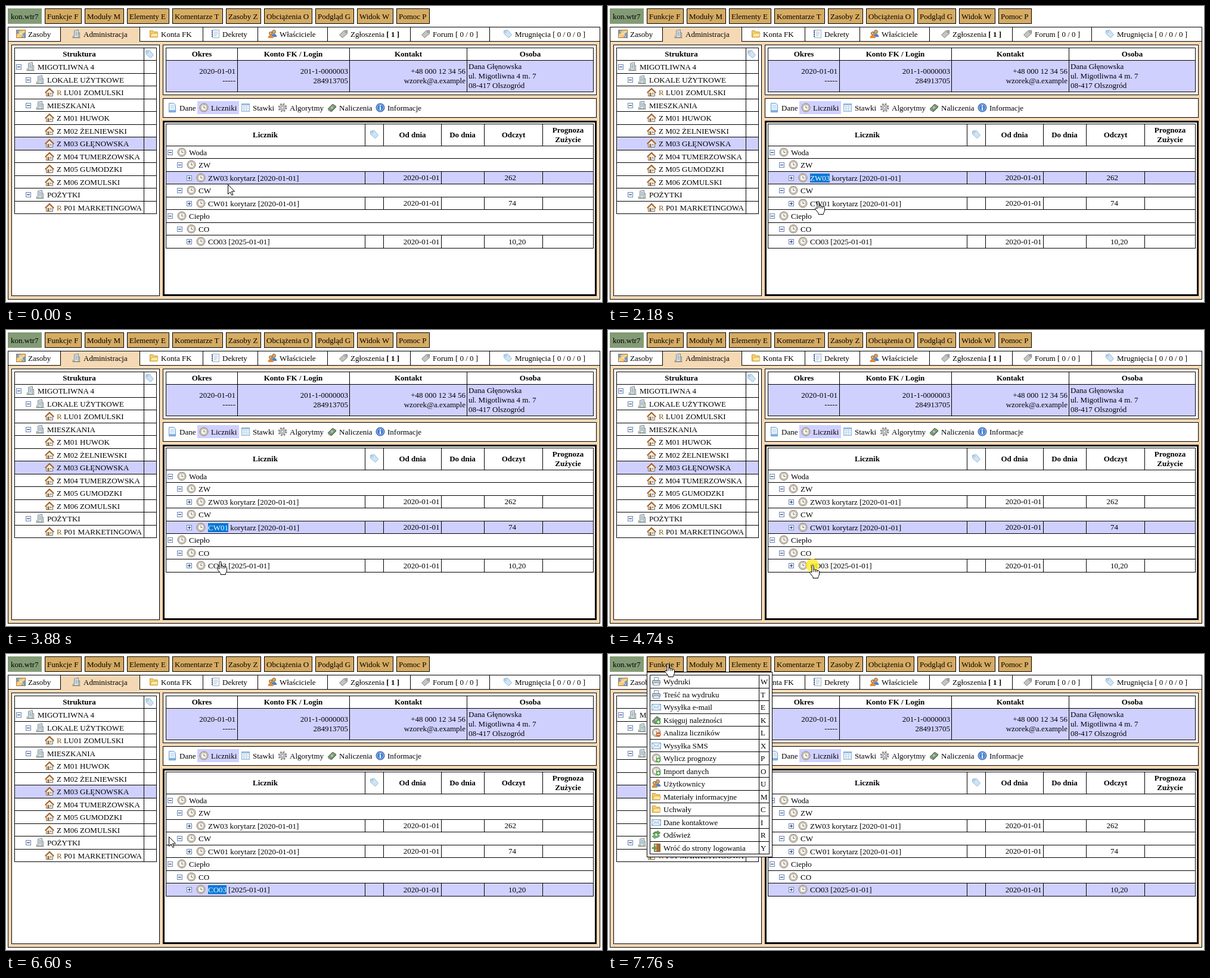
Animation, 1000 px wide and 498 px high, one loop 8 s. Source, as an HTML page:

```html
<!DOCTYPE html>
<html lang="pl">
<head>
<meta charset="utf-8">
<title>Administracja</title>
<style>
  html, body { margin: 0; width: 100%; height: 100%; overflow: hidden; background: #fff; }
  svg { display: block; }
  text { font: 13px "Liberation Serif", "Times New Roman", serif; white-space: pre; }
  .b { font-weight: bold; }
  .m { text-anchor: middle; }
  .e { text-anchor: end; }
  .flag { fill: #8b5a14; }
</style>
</head>
<body>
<svg id="stage" width="1000" height="498" viewBox="0 0 1000 498"></svg>
<script>
const PEACH = '#f5d9b5', PICK = '#d0d0ff', GOLD = '#d6ab62', LOOP = 8000;

// Icons on a 16 x 16 grid
const clock = `<circle cx="8" cy="8" r="7" fill="#d8cdb6" stroke="#85807a"/>
  <circle cx="8" cy="8" r="4.8" fill="#fbfaf6" stroke="#b3aa9a"/>
  <path d="M8 5v3.5h2.5" fill="none" stroke="#666"/>`;
const cash = `<path d="M1 10 9 2l6 4-8 8z" fill="#7d9a78" stroke="#56684f"/>
  <path d="M1 12l6 3 8-8" fill="none" stroke="#667a60"/><circle cx="8" cy="8" r="2" fill="#b4c6a8"/>`;
const badge = (fill, d) => `<circle cx="11.5" cy="11.5" r="4" fill="${fill}"/><path d="${d}" stroke="#fff" stroke-width="1.4"/>`;
const plus = badge('#4ba446', 'M9 11.5h5M11.5 9v5');
const icons = {
  map: `<rect x=".5" y="1.5" width="15" height="13" fill="#f3c675" stroke="#a87a3c"/>
    <path d="M1 2h6l-3 5-3 1zM9 14l2-6 4-3v9z" fill="#6d9fd2"/><path d="M1 13 14 3M4 3l9 10" stroke="#fff2cf"/>`,
  building: `<path d="M4.5 14V2.5l7-1.5v13z" fill="#dce5ea" stroke="#7e8c94"/>
    <path d="M6 5h4M6 7.5h4M6 10h4" stroke="#7d94a5"/><path d="M11 6h2.5v8M1.5 14.5h13M2.5 14v-3" fill="none" stroke="#768576"/>`,
  folder: `<path d="M1.5 13.5v-11h5l1.5 2h6v9z" fill="#f5cf6d" stroke="#cb9a35"/>
    <path d="M2 13 4.5 7H15l-1 6z" fill="#ffe9a5" stroke="#d9ab45"/>`,
  note: `<rect x="3.5" y="1.5" width="11" height="13" fill="#f5f8fb" stroke="#9fb0be"/>
    <path d="M3 2v12" stroke="#3c5f93" stroke-width="2" stroke-dasharray="2 1"/><path d="M6 5h6M6 8h6M6 11h4" stroke="#9eb8d0"/>`,
  users: `<circle cx="10.5" cy="4.5" r="3" fill="#d9a66c" stroke="#8a5c2c"/><path d="M6 13q0-5 4.5-5t5 5z" fill="#4c84c4"/>
    <circle cx="5" cy="7" r="2.5" fill="#e8b87a" stroke="#7a5028"/><path d="M.5 15q0-5 4.5-5t5 5z" fill="#e28b39"/>`,
  tag: `<path d="M1.5 2.5 8 1.5l6.5 8-5 5-8-7z" fill="#cfe4f5" stroke="#8fb5d8"/><circle cx="4.5" cy="4.5" r="1.3" fill="#fff" stroke="#7fa8ce"/>`,
  grayTag: `<path d="M14.5 2 9 2.5 1.5 9.5l5 5 8-7z" fill="#c2c6c2" stroke="#7e837f"/><circle cx="12" cy="4.8" r="1.2" fill="#fff" stroke="#777"/>`,
  page: `<path d="M2.5.5h8l3 3v12h-11z" fill="#e1effc" stroke="#6f9dcc"/><path d="M3 12h10v3H3z" fill="#83b4e4"/><path d="M5 5h6M5 8h6" stroke="#b8d2ea"/>`,
  clock,
  clockPlus: clock + plus,
  clockMinus: clock + badge('#d9632f', 'M9 11.5h5'),
  cash,
  cashPlus: cash + plus,
  grid: `<rect x="1.5" y="1.5" width="13" height="13" fill="#f4f9fd" stroke="#8db2d2"/><path d="M2 3h12" stroke="#8fbbe0" stroke-width="2"/>
    <path d="M2 6.5h12M2 9.5h12M2 12.5h12M5.5 2v12M9.5 2v12" stroke="#bcd4e8"/>`,
  gear: `<circle cx="8" cy="8" r="6" fill="none" stroke="#8d8f8d" stroke-width="3" stroke-dasharray="2.7 2"/>
    <circle cx="8" cy="8" r="4.5" fill="#d2d4d2" stroke="#909290"/><circle cx="8" cy="8" r="2" fill="#fff" stroke="#888"/>`,
  info: `<circle cx="8" cy="8" r="7" fill="#4a82d0" stroke="#2d5ca6"/><circle cx="8" cy="8" r="5.5" fill="none" stroke="#a9c8ef"/>
    <path d="M8 4v2M8 7v5" stroke="#fff" stroke-width="2"/>`,
  house: `<path d="M2.5 8v6.5h11V8L8 3z" fill="#f4eddc" stroke="#7d705a"/><path d="M.7 9 8 1.8 15.3 9" fill="none" stroke="#a9652f" stroke-width="2"/>
    <rect x="4.5" y="9" width="3" height="5.5" fill="#a66d3b"/><rect x="9" y="9" width="2.5" height="3" fill="#7daada"/>`,
  printer: `<path d="M4.5 7V1.5h7V7" fill="#f5f9fd" stroke="#7f97ad"/><rect x="1.5" y="6.5" width="13" height="6" rx="1" fill="#bcc8d2" stroke="#667683"/>
    <path d="M3.5 10.5h9l1 4h-11z" fill="#edf4fa" stroke="#7f97ad"/>`,
  mail: `<rect x=".5" y="3.5" width="15" height="10" fill="#e5f1fb" stroke="#7da5cc"/><path d="M1 4l7 5.5L15 4M1 13l5-5M15 13l-5-5" fill="none" stroke="#8fb4d6"/>`,
  refresh: `<path d="M2 7q2-5 8-4V1l5 4-5 4V6Q6 5 5 7z" fill="#5ca05a" stroke="#3c7a3d" stroke-width=".6"/>
    <path d="M14 9q-2 5-8 4v2l-5-4 5-4v3q4 1 5-1z" fill="#76b56e" stroke="#3c7a3d" stroke-width=".6"/>`,
  door: `<path d="M4.5 1.5h10v13h-10z" fill="#d6b184" stroke="#82582c"/><path d="M8.5 2 14 1v14.5l-5.5-2z" fill="#a66d35"/>
    <path d="M1 7h4V4.5L9 8.5l-4 4V10H1z" fill="#58a44f"/>`
};

const rect = (x, y, w, h, fill = '#000') => `<rect x="${x}" y="${y}" width="${w}" height="${h}" fill="${fill}"/>`;
const hLine = (x0, x1, y) => rect(x0, y, x1 - x0 + 1, 1);
const vLine = (x, y0, y1) => rect(x, y0, 1, y1 - y0 + 1);
const panel = (x0, y0, x1, y1, fill = '#fff', w = 1) =>
  rect(x0, y0, x1 - x0 + 1, y1 - y0 + 1) + rect(x0 + w, y0 + w, x1 - x0 + 1 - 2 * w, y1 - y0 + 1 - 2 * w, fill);
const label = (x, y, s, cls = '') => `<text x="${x}" y="${y}" class="${cls}">${s}</text>`;
const icon = (name, x, y) => `<use href="#${name}" x="${x}" y="${y}"/>`;
const toggle = (x, y, open) => `<rect x="${x + .5}" y="${y + .5}" width="8" height="8" fill="#f2f6fc" stroke="#6b87b5"/>` +
  rect(x + 2, y + 4, 5, 1, '#1c2f66') + (open ? '' : rect(x + 4, y + 2, 1, 5, '#1c2f66'));

const leftY = k => Math.round(91 + 21.5 * k);
const rightY = k => Math.floor(235 + 21.5 * k);

function topBar() {
  const buttons = [[65, 127, 'Funkcje F'], [132, 198, 'Moduły M'], [203, 274, 'Elementy E'], [279, 364, 'Komentarze T'],
    [369, 428, 'Zasoby Z'], [433, 514, 'Obciążenia O'], [519, 584, 'Podgląd G'], [589, 650, 'Widok W'], [655, 711, 'Pomoc P']];
  return rect(3, 4, 57, 26, '#829b75') + label(8, 22, 'kon.wtr7') +
    buttons.map(([a, b, s]) => panel(a, 4, b - 1, 29, GOLD) + label(a + 4, 22, s)).join('');
}

function tabs() {
  const list = [[3, 17, 'map', 'Zasoby'], [91, 110, 'building', 'Administracja'], [224, 240, 'folder', 'Konta FK'],
    [330, 343, 'note', 'Dekrety'], [422, 439, 'users', 'Właściciele'], [539, 558, 'grayTag', 'Zgłoszenia <tspan class="b">[ 1 ]</tspan>'],
    [678, 696, 'grayTag', 'Forum [ 0 / 0 ]'], [811, 834, 'tag', 'Mrugnięcia [ 0 / 0 / 0 ]']];
  return panel(3, 35, 996, 493, PEACH) + rect(4, 36, 992, 23, '#fff') + hLine(3, 996, 59) + rect(92, 36, 132, 24, PEACH) +
    list.map(([x, ix, name, s]) => vLine(x, 35, 59) + icon(name, ix, 39) + label(ix + 20, 52, s)).join('');
}

function tree() {
  const rows = [[0, 'MIGOTLIWNA 4'], [1, 'LOKALE UŻYTKOWE'], [2, 'LU01 ZOMULSKI', 'R'], [1, 'MIESZKANIA'], [2, 'M01 HUWOK', 'Z'],
    [2, 'M02 ŻELNIEWSKI', 'Z'], [2, 'M03 GŁĘNOWSKA', 'Z'], [2, 'M04 TUMERZOWSKA', 'Z'], [2, 'M05 GUMODZKI', 'Z'],
    [2, 'M06 ZOMULSKI', 'Z'], [1, 'POŻYTKI'], [2, 'P01 MARKETINGOWA', 'R']];
  let s = panel(9, 65, 257, 487) + panel(14, 70, 252, 349) + rect(15, leftY(6), 237, 22, PICK);
  s += label(123, 85, 'Struktura', 'b m') + icon('tag', 233, 73);
  rows.forEach(([level, name, flag], k) => {
    const y = Math.round(107 + 21.5 * k), x = 33 + 16 * level;
    s += hLine(14, 252, leftY(k)) + icon(flag ? 'house' : 'building', x, y - 13);
    if (!flag) s += toggle(x - 16, y - 9, true);
    const mark = flag ? `<tspan class="${flag === 'R' ? 'flag' : ''}">${flag}</tspan> ` : '';
    s += label(x + 20, y, mark + name);
  });
  return s + vLine(231, 70, 349);
}

function details() {
  let s = panel(263, 65, 990, 149) + panel(268, 70, 985, 144) + rect(269, 92, 716, 52, PICK) + hLine(268, 985, 91);
  s += [388, 576, 773].map(x => vLine(x, 70, 144)).join('');
  s += [[328.5, 'Okres'], [482, 'Konto FK / Login'], [675, 'Kontakt'], [879.5, 'Osoba']].map(([x, t]) => label(x, 85, t, 'b m')).join('');
  s += [[385, '2020-01-01', '-----'], [574, '201-1-0000003', '284913705'], [771, '+48 000 12 34 56', 'wzorek@a.example']]
    .map(([x, a, b]) => label(x, 114, a, 'e') + label(x, 130, b, 'e')).join('');
  return s + ['Dana Głęnowska', 'ul. Migotliwna 4 m. 7', '08-417 Olszogród'].map((t, i) => label(776, 106 + 16 * i, t)).join('');
}

function toolbar() {
  const items = [[271, 'page', 'Dane'], [324, 'clock', 'Liczniki'], [394, 'grid', 'Stawki'],
    [456, 'gear', 'Algorytmy'], [539, 'cash', 'Naliczenia'], [620, 'info', 'Informacje']];
  return panel(263, 155, 990, 187) + rect(321, 160, 70, 22, PICK) +
    items.map(([x, name, s]) => icon(name, x, 163) + label(x + 20, 176, s)).join('');
}

const cols = [602, 633, 730, 802, 900];

function meters() {
  const rows = [[0, 'Woda'], [1, 'ZW'], [2, 'ZW03 korytarz [2020-01-01]', '262'], [1, 'CW'], [2, 'CW01 korytarz [2020-01-01]', '74'],
    [0, 'Ciepło'], [1, 'CO'], [2, 'CO03 [2025-01-01]', '10', ',20']];
  let s = hLine(268, 985, 198) + hLine(268, 985, 407) + [268, 985].map(x => vLine(x, 198, 407)).join('');
  s += cols.map(x => vLine(x, 198, 235)).join('') + icon('tag', 610, 208);
  s += [[435, 221, 'Licznik'], [682, 221, 'Od dnia'], [766, 221, 'Do dnia'], [851.5, 221, 'Odczyt'], [943, 213, 'Prognoza'], [943, 229, 'Zużycie']]
    .map(([x, y, t]) => label(x, y, t, 'b m')).join('');
  rows.forEach(([level, name, whole, part = ''], k) => {
    const y = Math.floor(251 + 21.5 * k), cellY = Math.floor(250.5 + 21.5 * k), x = 287 + 16 * level;
    s += hLine(268, 985, rightY(k)) + toggle(x - 16, y - 9, !whole) + icon('clock', x, y - 13) + label(x + 20, y, name);
    if (whole) {
      s += cols.map(c => vLine(c, rightY(k), rightY(k + 1))).join('');
      s += label(727.5, cellY, '2020-01-01', 'e') + label(856, cellY, whole, 'e') + label(856, cellY, part);
    }
  });
  return s;
}

function menu() {
  const items = [['printer', 'Wydruki', 'W'], ['printer', 'Treść na wydruku', 'T'], ['mail', 'Wysyłka e-mail', 'E'],
    ['cashPlus', 'Księguj należności', 'K'], ['clockMinus', 'Analiza liczników', 'L'], ['mail', 'Wysyłka SMS', 'X'],
    ['clockPlus', 'Wylicz prognozy', 'P'], ['clockPlus', 'Import danych', 'O'], ['users', 'Użytkownicy', 'U'],
    ['folder', 'Materiały informacyjne', 'M'], ['folder', 'Uchwały', 'C'], ['mail', 'Dane kontaktowe', 'I'],
    ['refresh', 'Odśwież', 'R'], ['door', 'Wróć do strony logowania', 'Y']];
  return panel(65, 30, 275, 341) + panel(70, 35, 270, 336) + vLine(253, 35, 336) + items.map(([name, s, key], k) => {
    const y = Math.floor(51.5 + 21.5 * k);
    return hLine(70, 270, Math.round(35 + 21.5 * k)) + icon(name, 73, y - 13) + label(93, y, s) + label(256, y, key);
  }).join('');
}

const stage = document.getElementById('stage');
stage.innerHTML = `<defs>${Object.entries(icons).map(([id, d]) => `<symbol id="${id}" width="16" height="16" viewBox="0 0 16 16">${d}</symbol>`).join('')}</defs>
  ${topBar()}${tabs()}${tree()}${details()}${toolbar()}${panel(263, 193, 990, 487, '#fff', 3)}
  <rect id="active" x="269" width="716" height="22" fill="${PICK}"/>${meters()}
  <rect id="mark" x="339" height="15" fill="#0078d7"/><text id="marked" x="339" fill="#fff"></text>
  <g id="menu">${menu()}</g>
  <circle id="press" r="11" fill="#ffec1f"/>
  <g id="cursor" fill="#fff" stroke="#000" stroke-linejoin="round">
    <path id="arrow" d="M.5.5v16l3.7-3.5 2.5 5.5 2.3-1-2.5-5.5h5z"/>
    <path id="hand" d="M-1 13V2Q-1 .5.5.5T2 2v6q2-1 3.2.5Q7 8 8 9.5q2.7-.5 3.5 1.5v5q-.5 3-2 4.5v2H1v-2l-5.5-7q0-2 2-1.5zM2 8v4M5.2 8.500v4M8 9.5v3"/>
  </g>`;
const el = id => document.getElementById(id);

// Pointer moves: start, end, steps, then one point or a quadratic curve
const moves = [
  [0, 0, 1, 372, 300],
  [80, 80, 1, 371, 300],
  [230, 780, 8, 369, 299, 355, 290, 346, 289],
  [1080, 1470, 6, 340, 288, 356, 288, 373, 288],
  [1850, 2410, 8, 373, 288, 353, 341, 338, 331],
  [2730, 3340, 9, 342, 332, 356, 333, 371, 338],
  [3720, 4190, 7, 371, 338, 352, 438, 340, 396],
  [4420, 4420, 1, 343, 395],
  [4740, 5280, 8, 343, 395, 346, 396, 366, 395],
  [5450, 5450, 1, 367, 395],
  [5830, 5830, 1, 367, 391],
  [6290, 7060, 11, 362, 390, 255, 323, 126, 73],
  [7140, 7440, 5, 122, 66, 108, 35, 100, 16]
];
const presses = [[1080, 1850], [2730, 3720], [4740, 5830], [7610, 7680]];
const drags = [[1080, 1470, 2, 'ZW03'], [2730, 3340, 4, 'CW01'], [4740, 5450, 7, 'CO03'], [7610, 7610, 7, '']];
const pen = document.createElement('canvas').getContext('2d');
pen.font = '13px "Liberation Serif", "Times New Roman", serif';
const width = s => pen.measureText(s).width;
const lastOf = (list, t) => list.filter(m => m[0] <= t).pop();

function pointer(t) {
  const [t0, t1, n, x0, y0, cx, cy, x1, y1] = lastOf(moves, t);
  if (n === 1) return [x0, y0];
  const f = Math.min(1, Math.floor((t - t0) / (t1 - t0) * (n - 1) + 1e-6) / (n - 1));
  const curve = (a, c, b) => Math.round((1 - f) ** 2 * a + 2 * f * (1 - f) * c + f * f * b);
  return [curve(x0, cx, x1), curve(y0, cy, y1)];
}

function overLink(x, y) {
  if (y < 30 || (y > 35 && y < 59)) return true;
  if (x < 252) return y > 91 && y < 349;
  return x > 268 && [2, 4, 7].some(k => y > rightY(k) && y < rightY(k + 1));
}

function showMark(t, x) {
  const [, end, row, code] = lastOf(drags, t) || [0, 0, 0, ''];
  let n = code.length;
  if (t < end) {
    n = [...code].filter((c, i) => 339 + (width(code.slice(0, i)) + width(code.slice(0, i + 1))) / 2 < x).length;
  }
  const part = code.slice(0, n), y = Math.floor(251 + 21.5 * row);
  el('mark').setAttribute('width', Math.round(width(part)));
  el('mark').setAttribute('y', y - 12);
  el('marked').setAttribute('y', y);
  el('marked').textContent = part;
}

const show = (id, on) => { el(id).style.display = on ? '' : 'none'; };

function draw(t) {
  const [x, y] = pointer(t), hand = overLink(x, y);
  const press = presses.find(([a, b]) => t >= a && t < b);
  el('active').setAttribute('y', rightY(t < 3720 ? 2 : t < 5830 ? 4 : 7));
  showMark(t, x);
  show('menu', t >= 7680);
  show('press', press);
  if (press) {
    el('press').setAttribute('cx', x);
    el('press').setAttribute('cy', y + 1);
    el('press').setAttribute('opacity', t - press[0] < 70 ? .8 : .62);
  }
  el('cursor').setAttribute('transform', `translate(${x} ${y})`);
  show('hand', hand);
  show('arrow', !hand);
}

const begin = performance.now();
function tick() {
  draw((performance.now() - begin) % LOOP);
  requestAnimationFrame(tick);
}
tick();
</script>
</body>
</html>
```
